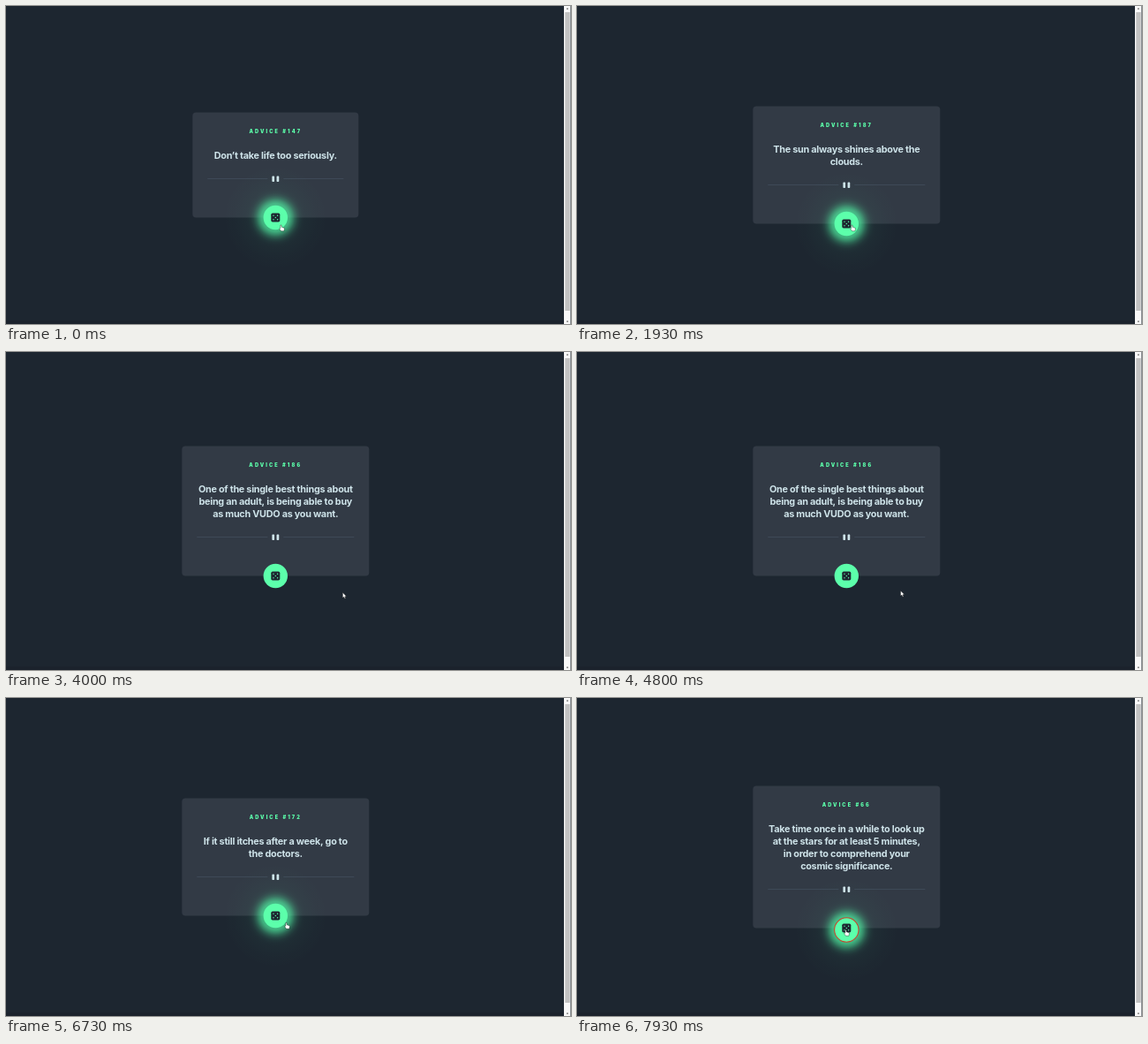
An HTML page with a canvas for the animation above (8000 ms loop, 640 px wide and 360 px high).

```html
<!DOCTYPE html>
<html lang="en">
<head>
<meta charset="utf-8">
<title>Advice generator</title>
<style>
html, body { margin: 0; width: 100%; height: 100%; overflow: hidden; background: #1d2630; }
canvas { display: block; }
</style>
</head>
<body>
<canvas id="stage" width="640" height="360"></canvas>
<script>
const ctx = document.getElementById('stage').getContext('2d');
const LOOP = 8000, CENTER = 305.3, PRESS_TIME = 140;
const GREEN = '#5cffab', DARK = '#1d2630', PALE = '#cee3e9', RULE = '#4a586b';

const cards = [
  { from: 0, id: 147, lines: ['Don’t take life too seriously.'] },
  { from: 1300, id: 187, lines: ['The sun always shines above the', 'clouds.'] },
  { from: 2300, id: 186, lines: ['One of the single best things about', 'being an adult, is being able to buy', 'as much VUDO as you want.'] },
  { from: 5300, id: 172, lines: ['If it still itches after a week, go to', 'the doctors.'] },
  { from: 6880, id: 66, lines: ['Take time once in a while to look up', 'at the stars for at least 5 minutes,', 'in order to comprehend your', 'cosmic significance.'] }
];

// The pointer rests on the button and makes trips away from it.
const firstRest = { x: 311.5, y: 248 };
const trips = [
  { leave: 2120, back: 3520, far: { x: 463, y: 309 }, rest: { x: 308, y: 252 } },
  { leave: 3798, back: 5000, far: { x: 499, y: 305 }, rest: { x: 308, y: 255 } },
  { leave: 5150, back: 6400, far: { x: 474, y: 307 }, rest: { x: 317.5, y: 254.5 } },
  { leave: 6740, back: 7600, far: { x: 522, y: 320 }, rest: { x: 304.5, y: 262.5 } }
];
const presses = [520, 1980, 5000, 6580, LOOP - PRESS_TIME];

function ease(u) {
  const c = Math.min(1, Math.max(0, u));
  return c * c * (3 - 2 * c);
}

const mix = (a, b, u) => ({ x: a.x + (b.x - a.x) * u, y: a.y + (b.y - a.y) * u });

function pointerAt(t) {
  return trips.reduce((pos, { leave, back, far, rest }) => {
    const u = (t - leave) / (back - leave);
    return mix(mix(pos, far, ease(u / 0.4)), rest, ease((u - 0.55) / 0.45));
  }, firstRest);
}

function box(x, y, w, h, r, color) {
  ctx.fillStyle = color;
  ctx.beginPath();
  ctx.roundRect(x, y, w, h, r);
  ctx.fill();
}

function disc(x, y, r, color) {
  ctx.fillStyle = color;
  ctx.beginPath();
  ctx.arc(x, y, r, 0, Math.PI * 2);
  ctx.fill();
}

function text(str, y, font, spacing, color) {
  ctx.font = font + ' Inter, sans-serif';
  ctx.letterSpacing = spacing;
  ctx.textAlign = 'center';
  ctx.fillStyle = color;
  ctx.fillText(str, CENTER, y);
}

function drawPage() {
  box(0, 0, 640, 360, 0, DARK);
  box(0, 356, 632, 4, 0, '#1b222c');
  box(632, 0, 7.5, 360, 0, '#f8f8f8');
  box(633.3, 7, 5.4, 338, 0, '#c1c1c1');
  for (const y of [2.5, 356.5]) box(635, y, 1.8, 1.3, 0, '#666');
}

function drawCard({ id, lines }, top, bottom) {
  const width = lines.length > 1 ? 212 : 188;
  const ruleY = bottom - 44, ruleWidth = width / 2 - 26;
  box(CENTER - width / 2, top, width, bottom - top, 4, '#323a45');
  text('ADVICE #' + id, top + 23.1, '900 5.6px', '2.1px', GREEN);
  lines.forEach((line, i) => text(line, top + 52.7 + 14 * i, '700 10.8px', '-0.25px', PALE));
  for (const side of [-1, 1]) {
    box(CENTER + side * (9 + ruleWidth / 2) - ruleWidth / 2, ruleY, ruleWidth, 0.6, 0, RULE);
    box(CENTER + side * 2.6 - 1.35, ruleY - 2.9, 2.7, 6.4, 0.8, PALE);
  }
}

function drawGlow(y) {
  const reach = 58, glow = ctx.createRadialGradient(CENTER, y, 0, CENTER, y, reach);
  for (let r = 13; r <= reach; r += 3) {
    const alpha = 0.65 * Math.exp(-(((r - 13) / 9) ** 2)) + 0.06 * (1 - r / reach);
    glow.addColorStop(r / reach, `rgba(83,255,170,${alpha})`);
  }
  disc(CENTER, y, reach, glow);
}

function drawButton(y, hover, pressed) {
  const cy = y + (pressed ? 2 : 0);
  if (hover) drawGlow(cy);
  disc(CENTER, cy, 13.7, GREEN);
  if (pressed) {
    ctx.strokeStyle = '#c8452f';
    ctx.lineWidth = 1.1;
    ctx.stroke();
  }
  box(CENTER - 5, y - 5, 10, 10, 1.7, DARK);
  disc(CENTER, y, 0.7, GREEN);
  for (const dx of [-2.3, 2.3])
    for (const dy of [-2.3, 2.3]) disc(CENTER + dx, y + dy, 0.7, GREEN);
}

const arrow = new Path2D('M0 0V6L1.4 4.8 2.4 7 3.4 6.6 2.4 4.4 4.3 4.3Z');
const hand = new Path2D('M-.6 0H.5L.7 2.2 4 3.5 3.4 6.8H0L-2 4-.6 3.6Z');

function drawPointer({ x, y }, hover) {
  const shape = hover ? hand : arrow;
  ctx.save();
  ctx.translate(x, y);
  ctx.fillStyle = '#fff';
  ctx.fill(shape);
  ctx.strokeStyle = 'rgba(0,0,0,.7)';
  ctx.lineWidth = 0.5;
  ctx.stroke(shape);
  ctx.restore();
}

function draw(t) {
  const card = cards.findLast(c => c.from <= t);
  const height = 105 + 14 * card.lines.length;
  const top = 180 - height / 2, bottom = top + height;
  const pointer = pointerAt(t);
  const hover = Math.hypot(pointer.x - CENTER, pointer.y - bottom) < 15.5;
  const pressed = hover && presses.some(p => t >= p && t < p + PRESS_TIME);
  drawPage();
  drawCard(card, top, bottom);
  drawButton(bottom, hover, pressed);
  drawPointer(pointer, hover);
}

const start = performance.now();
function tick() {
  draw((performance.now() - start) % LOOP);
  requestAnimationFrame(tick);
}
tick();
</script>
</body>
</html>
```
